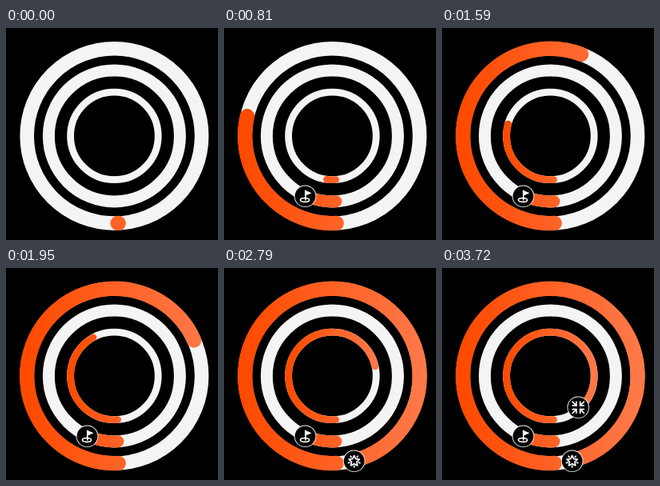
Write an HTML page with a canvas that moves like this. It is 265 px wide and 265 px high and loops after 3.75 s.

```html
<!DOCTYPE html>
<html lang="en">
<head>
<meta charset="utf-8">
<title>Activity rings</title>
<style>
  html, body { margin: 0; height: 100%; overflow: hidden; background: #000; }
  canvas { display: block; width: 265px; height: 265px; }
</style>
</head>
<body>
<canvas id="stage" width="265" height="265"></canvas>
<script>
const ctx = document.getElementById('stage').getContext('2d');
const LOOP = 3750, CX = 135.4, CY = 134.9;
const rad = deg => (deg + 90) * Math.PI / 180; // 0 = bottom, clockwise

// Angles in degrees; sweep(t) is the angle of the leading end.
const rings = [
  { r: 109.2, width: 18.4, track: 17.6, from: -2.8, to: 346, begin: 0,
    sweep: t => Math.min(-2.4 + 0.2 * t, 1.3 + 0.1254 * t) },
  { r: 82, width: 15, track: 15, from: -3.2, to: 24.5, begin: 525,
    sweep: t => -3.2 + 0.126 * (t - 525) },
  { r: 54.8, width: 8.8, track: 8.8, from: -4.4, to: 318, begin: 725,
    sweep: t => 7 + 0.1264 * (t - 810) }
];

const badges = [
  { x: 101.5, y: 210.3, begin: 685, draw: flag },
  { x: 162.7, y: 241.3, begin: 2670, draw: star },
  { x: 170.3, y: 174.3, begin: 3240, draw: arrows }
];

function arc(r, width, from, to, style) {
  ctx.beginPath();
  ctx.arc(CX, CY, r, rad(from), rad(to));
  ctx.lineWidth = width;
  ctx.strokeStyle = style;
  ctx.stroke();
}

function disc(r, color) {
  ctx.beginPath();
  ctx.arc(0, 0, r, 0, 2 * Math.PI);
  ctx.fillStyle = color;
  ctx.fill();
}

function line(...points) {
  ctx.beginPath();
  points.forEach(([x, y]) => ctx.lineTo(x, y));
  ctx.stroke();
}

function flag() {
  ctx.beginPath();
  ctx.ellipse(-0.5, 4.6, 5.5, 2.4, 0, 0, 2 * Math.PI);
  ctx.stroke();
  line([0.3, 4.5], [0.3, -7]);
  ctx.beginPath();
  ctx.moveTo(0.3, -7.4);
  ctx.lineTo(8, -4);
  ctx.lineTo(0.3, -0.6);
  ctx.fill();
}

function star() {
  ctx.beginPath();
  for (let i = 0; i < 10; i++) {
    const r = i % 2 ? 3.4 : 7, a = i * Math.PI / 5;
    ctx.lineTo(r * Math.sin(a), -r * Math.cos(a));
  }
  ctx.closePath();
  ctx.stroke();
  for (let i = 0; i < 5; i++) {
    line([0, 6], [0, 7.6]);
    ctx.rotate(2 * Math.PI / 5);
  }
}

function arrows() {
  for (let i = 0; i < 4; i++) {
    line([2.4, 2.4], [7.2, 7.2]);
    line([2.4, 7], [2.4, 2.4], [7, 2.4]);
    ctx.rotate(Math.PI / 2);
  }
}

function pop(p) {
  if (p >= 1) return 1;
  const q = p - 1;
  return 1 + 3.6 * q ** 3 + 2.6 * q ** 2;
}

function drawBadge({ x, y, begin, draw }, t) {
  if (t < begin) return;
  const scale = pop((t - begin) / 110);
  ctx.save();
  ctx.translate(x, y);
  ctx.scale(scale, scale);
  disc(13.8, '#f4f4f4');
  disc(12.9, '#000');
  ctx.strokeStyle = ctx.fillStyle = '#fff';
  ctx.lineWidth = 1.7;
  draw();
  ctx.restore();
}

// Each ring fades from left to right across its own width.
for (const ring of rings) {
  const fade = ctx.createLinearGradient(CX - ring.r, 0, CX + ring.r, 0);
  fade.addColorStop(0, '#ff4a00');
  fade.addColorStop(1, '#ff7848');
  ring.color = fade;
}

function render(t) {
  ctx.fillStyle = '#000';
  ctx.fillRect(0, 0, 265, 265);
  ctx.lineCap = 'round';
  ctx.lineJoin = 'round';
  for (const { r, width, track, from, to, begin, sweep, color } of rings) {
    arc(r, track, 0, 360, '#f4f4f4');
    if (t < begin) continue;
    const end = Math.max(from + 0.1, Math.min(to, sweep(t)));
    arc(r, width, from, end, color);
  }
  badges.forEach(badge => drawBadge(badge, t));
}

const start = performance.now();
function tick() {
  render((performance.now() - start) % LOOP);
  requestAnimationFrame(tick);
}
tick();
</script>
</body>
</html>
```
